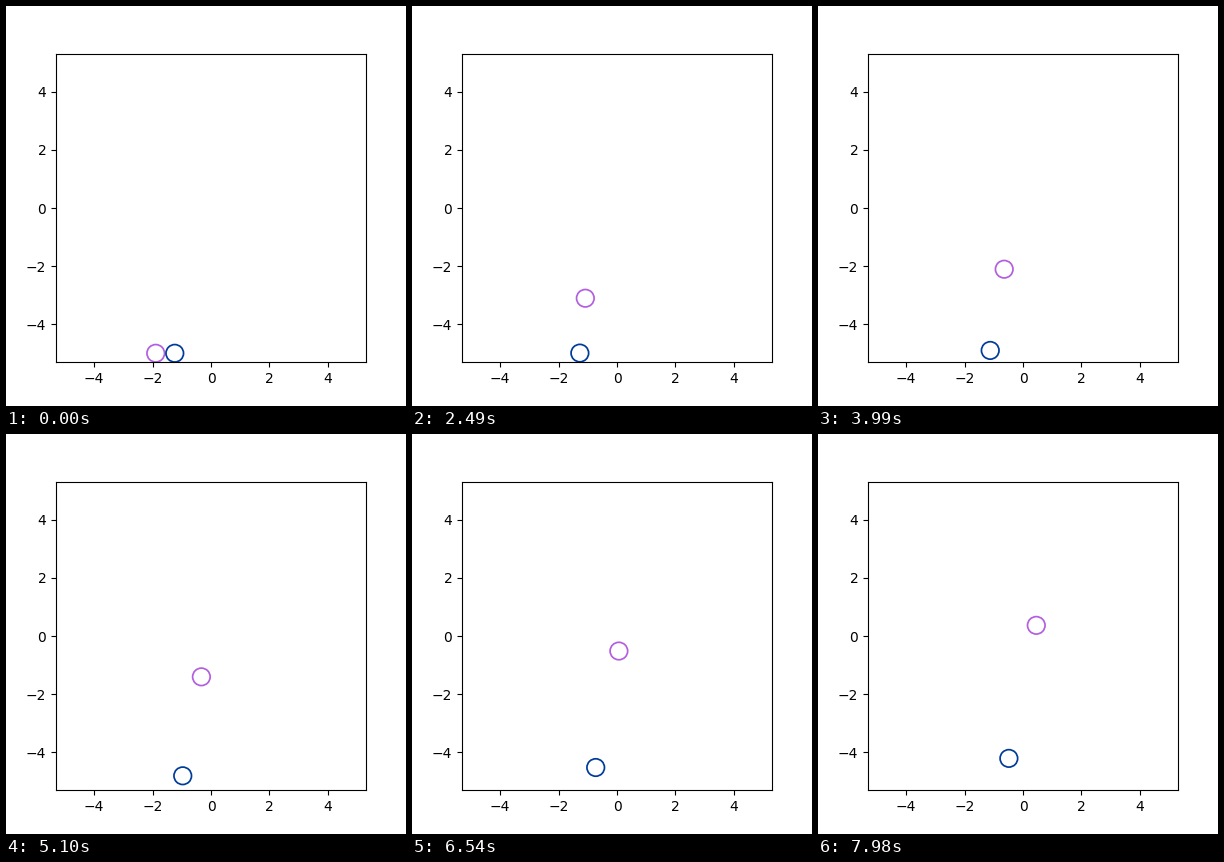
Animation of 400 by 400 pixels, one loop 8000 ms. Source, as a matplotlib script:

```python
import matplotlib.pyplot as plt
import numpy as np
from matplotlib.animation import FuncAnimation
from matplotlib.patches import Circle

LOOP_MS = 8000
STEP = 0.03  # simulated seconds per frame
FRAMES = 267
RADIUS = 0.3
LIMIT = 5 + RADIUS
KICK_TIMES = 2.88, 5.31


class Ball:
    """A ball that drifts freely and changes velocity at each kick."""

    def __init__(self, ax, color, start, velocity, kicks):
        self.start = np.array(start)
        self.velocity = np.array(velocity)
        self.kicks = np.array(kicks)
        self.circle = Circle(start, RADIUS, fill=False, edgecolor=color, lw=1.25)
        ax.add_patch(self.circle)

    def move(self, t):
        since_kick = np.maximum(t - np.array(KICK_TIMES), 0)
        self.circle.center = self.start + self.velocity * t + since_kick @ self.kicks


fig, ax = plt.subplots(figsize=(4, 4), dpi=100)
ax.set_xlim(-LIMIT, LIMIT)
ax.set_ylim(-LIMIT, LIMIT)

balls = [
    Ball(ax, "#b25fe0", (-1.89, -5), (0.324, 0.761),
         [(-0.041, -0.129), (-0.012, -0.018)]),
    Ball(ax, "#003b9a", (-1.239, -5), (-0.0125, 0.0026),
         [(0.1515, 0.079), (0.031, 0.1365)]),
]


def update(frame):
    for ball in balls:
        ball.move(frame * STEP)
    return [ball.circle for ball in balls]


anim = FuncAnimation(fig, update, frames=FRAMES, interval=LOOP_MS / FRAMES,
                     repeat=True, repeat_delay=0)
plt.show()
```
